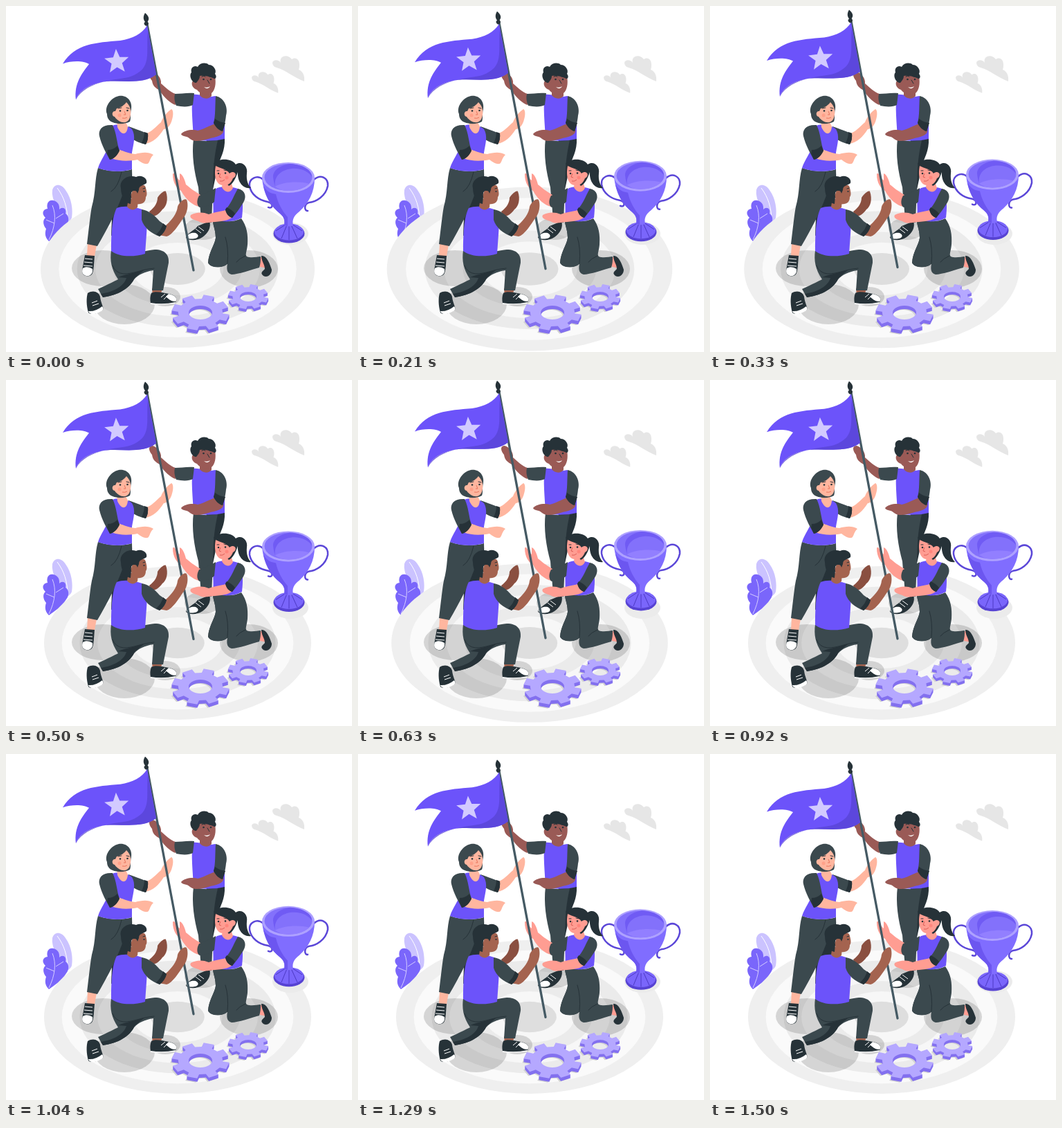
Write an HTML page that moves like this. It is 500 px wide and 500 px high and loops after 1540 ms.

```html
<!DOCTYPE html>
<html lang="en">
<head>
<meta charset="utf-8">
<title>Team raising a flag</title>
<style>
html, body { margin: 0; width: 100%; height: 100%; overflow: hidden; background: #fff; }
svg { display: block; width: 100%; height: 100%; }
.p { fill: #6c53fa; }
.s { fill: #5743d3; }
.d { fill: #3b494e; }
.k { fill: #263238; }
.w { fill: #fff; }
.a { fill: #ffb69f; }
.b { fill: #ff9d92; }
.c { fill: #a4634f; }
.e { fill: #9a5a56; }
.l { fill: none; stroke: #263238; stroke-width: 1; stroke-linecap: round; }
.sh { fill: #000; opacity: .14; }
</style>
</head>
<body>
<svg viewBox="0 0 500 500">
  <g id="plant">
    <path fill="#cbc3ff" d="M67 266C70 256 80 257 86 266C95 278 97 295 95 306C92 314 80 318 74 306C76 294 65 278 67 266Z"/>
    <path fill="none" stroke="#fff" d="M74 263C84 276 89 292 89 310"/>
    <path fill="#7a66fb" d="M62 340C56 334 56 328 58 322C53 316 53 309 57 306C51 300 53 294 60 293C58 285 62 280 68 281C74 282 78 287 77 294C82 289 88 293 86 300C91 303 92 311 87 317C80 328 70 334 62 340Z"/>
    <path fill="none" stroke="#d5cdff" d="M67 288C73 302 71 320 62 338M58 309L70 314M72 307L83 300"/>
  </g>
  <g id="floor"></g>
  <g class="sh">
    <ellipse cx="140" cy="379" rx="45" ry="26"/>
    <ellipse cx="171" cy="431" rx="44" ry="29"/>
    <ellipse cx="230" cy="420" rx="22" ry="14"/>
    <ellipse cx="351" cy="380" rx="42" ry="27"/>
    <ellipse cx="284" cy="322" rx="26" ry="16"/>
  </g>
  <ellipse cx="411" cy="329" rx="26" ry="16" fill="#ebebeb"/>
  <g fill="#e6e6e6">
    <path id="cloud" d="M385 82C386 77 394 77 397 82C394 71 408 69 413 77C423 71 426 84 423 92C429 94 432 101 431 109C417 104 405 93 391 89C387 88 385 85 385 82Z"/>
    <use href="#cloud" transform="translate(35.5 35.4) scale(.83)"/>
  </g>

  <g id="cup">
    <g fill="none" stroke="#5b47d8" stroke-width="2.5" stroke-linecap="round">
      <path d="M372 251C362 243 351 250 352 260C354 273 366 281 378 283C387 285 386 294 379 291"/>
      <path d="M445 251C455 242 466 249 465 260C462 275 448 283 438 284C430 286 431 297 436 296"/>
    </g>
    <ellipse cx="409" cy="329" rx="22.5" ry="13.5" fill="#5743d3"/>
    <ellipse cx="409" cy="326.5" rx="21" ry="12" fill="#7a66fb"/>
    <path fill="none" stroke="#4c39c4" d="M407 314L390 325M407 314L398 336M409 314V338M411 314L421 336M411 314L428 325"/>
    <path fill="#806dff" d="M370 248C372 275 384 290 396 300C403 306 403 311 402 317Q409 320 415 317C413 309 416 303 424 297C437 285 446 270 446 248Z"/>
    <path fill="#6c56f0" d="M372 260C378 270 385 271 390 272C393 285 399 296 407 305Q407 313 407 318L402 317C403 311 403 306 396 300C385 291 376 279 372 260Z"/>
    <ellipse cx="408" cy="248" rx="38" ry="22" fill="#aea1ff"/>
    <ellipse cx="408" cy="247.5" rx="34.5" ry="19.5" fill="#8371fb"/>
    <path fill="#705bf4" d="M386 247C386 236 398 230 410 228C429 229 442 237 442 247C438 240 427 234 413 235C396 237 387 247 389 261Q387 256 386 247Z"/>
    <path fill="#927fff" d="M389 261C401 254 424 253 438 257C430 264 420 267 408 267C400 267 393 264 389 261Z"/>
  </g>

  <g id="gears"></g>

  <g id="tallMan">
    <path class="k" d="M290 192L316 191C317 210 309 220 306 232L298 270L283 275Z"/>
    <path class="d" d="M271 192C282 196 295 196 306 194C302 212 301 222 300 235L297 313L282 313C281 290 279 276 278 262C272 240 268 215 271 192Z"/>
    <path class="k" d="M277 318L294 311C297 320 292 328 284 334C275 340 264 339 260 335C261 328 272 325 277 318Z"/>
    <path class="w" d="M261 333C264 328 270 327 274 328C279 330 279 335 273 336C267 337 261 337 261 333Z"/>
    <path stroke="#fff" d="M274 322L282 328M278 319L286 325"/>
    <path class="e" d="M245 127C238 125 230 117 224 112C225 105 219 97 212 95C205 95 206 102 211 108C212 116 217 119 222 122C228 132 238 141 245 143Z"/>
    <path class="p" d="M270 128C280 126 290 134 302 130C312 135 317 145 316 156V192C300 196 282 195 271 193C270 170 267 145 270 128Z"/>
    <path class="d" d="M272 126C262 125 252 127 244 127Q242 135 246 144C255 146 265 146 270 143Z"/>
    <path class="e" d="M280 118L297 120V130C292 136 284 134 280 129Z"/>
    <path class="e" d="M313 167C300 169 287 178 277 180C270 178 258 179 253 185C254 189 261 187 266 192C274 198 285 194 296 191C306 189 316 186 314 178Z"/>
    <path class="d" d="M303 130C316 133 321 147 318 158C317 168 315 176 313 181C308 180 303 175 300 169C303 158 302 145 303 130Z"/>
    <path class="k" d="M302 163C307 167 312 168 317 169L313 181C308 180 303 175 300 169Z"/>
    <path class="e" d="M272 99C284 100 298 97 302 102C304 112 302 122 297 126C290 130 280 127 276 121C268 119 266 108 273 107Z"/>
    <path class="k" d="M275 111C268 111 264 100 268 96C266 89 272 85 277 88C280 82 289 81 293 85C300 85 305 93 302 98C306 103 302 107 299 104C293 101 283 100 280 101C280 106 277 108 275 111Z"/>
    <path class="l" d="M283 102Q286 100 288 102M294 102L298 102M291 107L294 112"/>
    <circle class="k" cx="285.500" cy="106" r="1.300"/><circle class="k" cx="296" cy="106" r="1.300"/>
    <path class="w" d="M286 117Q291 119 295 116Q292 122 286 117Z"/>
  </g>

  <g id="leftWoman">
    <path class="k" d="M155 255L182 236C184 270 176 300 169 330L152 332Z"/>
    <path class="a" d="M118 343L131 345L128 362L117 361Z"/>
    <path class="d" d="M133 234C150 240 170 240 182 236C182 248 178 258 170 268C163 290 148 320 132 347L117 344C120 320 122 300 124 290C130 270 128 250 133 234Z"/>
    <path class="l" d="M167 240Q162 262 152 268"/>
    <path class="k" d="M114 360L128 361C127 372 127 384 124 388C119 393 109 390 110 382Z"/>
    <path class="w" d="M111 379C115 376 121 377 125 380C126 387 121 391 116 390C110 388 109 384 111 379Z"/>
    <path stroke="#fff" d="M114 365L125 366M113 370L125 371M112 375L125 376"/>
    <path class="a" d="M203 184C210 182 217 174 224 168C227 160 233 153 239 149C242 150 242 158 240 164C238 173 232 178 228 178C221 189 212 198 201 199Z"/>
    <path class="d" d="M177 174C189 178 198 182 205 184Q206 193 202 200C194 198 187 196 180 190Z"/>
    <path class="k" d="M200 182L205 184Q206 193 202 200L196 198Q200 190 200 182Z"/>
    <path class="p" d="M154 173C160 170 176 172 182 178C188 188 184 200 182 212V236C165 241 145 239 133 234C137 222 145 212 147 205C148 190 148 178 154 173Z"/>
    <path class="a" d="M160 164L172 166L176 174C175 187 167 188 161 175Z"/>
    <path class="a" d="M152 220C165 225 180 224 190 222C196 227 203 230 206 227C209 222 208 220 213 215C205 210 195 212 187 214C176 213 168 209 160 206Z"/>
    <path class="d" d="M154 172C139 171 133 179 135 188C138 201 145 213 150 222C156 221 161 215 164 209C160 198 160 184 154 172Z"/>
    <path class="k" d="M147 208Q155 208 161 202L164 209C161 216 156 221 150 222L146 213Z"/>
    <path class="d" d="M146 156C142 147 150 133 163 130C175 128 183 138 181 149C179 156 181 162 179 167C172 171 161 171 154 168C149 166 146 162 146 156Z"/>
    <path class="a" d="M160 148C166 147 171 143 174 139C179 144 181 150 180 157C179 165 175 169 168 168C163 167 159 163 157 160C152 159 153 151 158 152Z"/>
    <circle class="k" cx="165" cy="151.500" r="1.300"/><circle class="k" cx="175.500" cy="151" r="1.300"/>
    <path class="l" d="M162 148L167 147M174 147L178 148"/>
    <path fill="none" stroke="#e8765f" d="M171 152L173 157L170 157M168 162Q172 163 175 161"/>
    <circle cx="164" cy="158" r="2.500" fill="#ff927b" opacity=".6"/>
  </g>

  <g id="rightWoman">
    <path class="b" d="M281 273C272 268 265 262 260 258C258 250 255 243 251 242L251 252C246 248 243 238 241 243C241 256 247 264 253 267C260 280 270 288 279 290Z"/>
    <path class="b" d="M364 363L374 363L378 379L367 377Z"/>
    <path class="k" d="M369 361C376 360 381 371 384 381C384 388 378 393 372 390C367 386 370 384 374 380C374 373 369 369 369 361Z"/>
    <path class="k" d="M300 306L325 312L321 372C312 380 295 378 292 371C293 355 302 345 303 335C303 320 297 315 300 306Z"/>
    <path class="d" d="M300 306C312 314 330 312 340 307C348 318 350 330 349 345C348 355 345 360 348 362C355 365 363 362 368 362C368 368 368 372 366 378C355 381 335 388 326 388C318 386 319 378 320 372L317 375C308 379 295 378 292 371C293 355 302 345 303 335C303 320 297 315 300 306Z"/>
    <path class="l" d="M320 372Q322 350 317 334M346 361Q337 365 333 370"/>
    <path class="p" d="M302 265C310 259 325 261 335 264C343 272 343 290 341 306C326 314 309 312 299 307C301 292 297 276 302 265Z"/>
    <path class="d" d="M303 263C295 268 285 272 279 274C274 283 277 290 280 291C289 290 297 287 301 283Z"/>
    <path class="b" d="M313 254L325 254L328 263C324 271 316 270 312 262Z"/>
    <path class="b" d="M322 294C310 297 301 298 293 301C284 297 274 298 267 302C264 307 272 309 278 311C285 316 295 312 302 312C315 311 325 309 329 303Z"/>
    <path class="d" d="M335 264C346 266 348 276 343 284C338 292 333 299 327 306C322 305 318 300 317 294C325 287 328 276 335 264Z"/>
    <path class="k" d="M319 291Q326 294 331 300L327 306C322 305 318 300 317 294Z"/>
    <path class="k" d="M300 228C305 220 326 219 332 229C341 223 350 232 348 242C347 252 350 259 354 263C342 265 334 253 335 240C332 249 328 257 322 260L310 246Z"/>
    <path class="b" d="M303 231C310 235 319 235 323 242C330 236 336 245 328 249C325 256 321 260 313 259C304 258 300 247 303 231Z"/>
    <circle class="k" cx="307" cy="242" r="1.300"/><circle class="k" cx="317" cy="241.500" r="1.300"/>
    <path class="l" d="M305 238L308 238M315 237L320 238"/>
    <path fill="none" stroke="#dc5f59" d="M310 242L308 247L311 248M309 253Q313 254 316 251"/>
    <circle cx="319" cy="248" r="2.500" fill="#ff7770" opacity=".6"/>
  </g>

  <g id="flag">
    <path stroke="#455a64" stroke-width="3.300" stroke-linecap="round" d="M203.500 24L271 382"/>
    <path class="k" d="M201 10C205 13 207 17 206 20L204.500 23A3 3 0 1 1 201 23C198 19 198 15 201 10Z"/>
    <path class="p" d="M204 28C197 40 183 47 165 50C130 53 100 54 82 83.500C95 79 112 79 120 84C110 97 98 112 101 135.500C107 119 125 112 145 109C170 107 197 114 217 99Z"/>
    <path class="s" opacity=".75" d="M205 35C202 70 212 90 180 102C165 107 117 106 101 135.500C107 119 125 112 145 109C170 107 197 114 217 99Z"/>
    <polygon id="star" fill="#d2caff"/>
  </g>

  <g id="kneelingMan">
    <path fill="#8a4f40" d="M207 297C215 291 219 284 219 277C223 271 229 266 231 268C235 279 232 290 226 294C221 301 216 304 210 304Z"/>
    <path class="c" d="M211 408H226L223 419H212Z"/>
    <path class="k" d="M210 415C216 411 228 415 236 416C246 418 248 424 245 428C235 431 218 431 209 430C208 424 208 420 210 415Z"/>
    <path class="w" d="M235 416C246 418 248 424 245 427C237 427 234 422 231 420ZM209 429Q227 432 245 428L244 430Q227 432 209 431Z"/>
    <path stroke="#fff" d="M224 421L230 416M228 424L234 418"/>
    <path class="k" d="M118 415C126 410 134 413 136 420C137 430 142 436 140 439C132 445 122 447 119 443C116 432 116 422 118 415Z"/>
    <path class="w" d="M119 441Q129 442 139 434C142 438 140 440 136 442C129 446 121 447 119 441Z"/>
    <path stroke="#fff" d="M124 429L132 426M125 433L134 430"/>
    <path class="d" d="M152 353C165 362 200 354 215 352C230 352 236 360 235 371L227 411L211 411L213 382C200 384 192 388 185 395C178 408 162 418 140 421L133 409C148 402 158 397 162 395C152 380 150 368 152 353Z"/>
    <path class="k" d="M162 392C174 387 189 385 200 381C192 388 187 391 185 395C178 408 162 418 140 421L137 416C157 413 171 404 174 393Z"/>
    <path class="l" d="M154 375Q158 386 170 387C185 387 194 381 214 379"/>
    <path class="p" d="M160 292C170 288 185 290 197 294C205 302 204 318 203 330L201 358C185 363 163 363 152 354C152 330 153 305 160 292Z"/>
    <path class="c" d="M231 317C240 309 247 300 248 290C250 284 258 277 261 280C264 287 262 298 258 304C250 315 241 331 232 333L221 331Z"/>
    <path class="d" d="M196 294C206 295 215 303 222 311L232 318Q230 327 222 333C210 329 199 320 196 309Z"/>
    <path class="k" d="M227 314L232 318Q230 327 222 333L217 330Q225 323 227 314Z"/>
    <path class="c" d="M177 278L191 280L190 291C184 297 178 294 175 290Z"/>
    <path class="c" d="M187 259C193 257 199 258 201 260C203 266 205 273 202 276C202 284 197 287 189 286L179 276Z"/>
    <path class="k" d="M166 263C163 252 176 243 188 247C197 243 205 250 203 256C198 260 192 259 192 266L190 271C187 264 179 267 181 275L180 286C172 285 166 275 166 263Z"/>
    <circle class="c" cx="185.500" cy="271" r="4"/>
    <path class="l" d="M198 264L201 263"/><circle class="k" cx="199.500" cy="268" r="1.100"/>
  </g>
</svg>
<script>
const PERIOD = 1540, LEAD = 40, LIFT = 9.5;
const $ = id => document.getElementById(id);

// Alternating floor rings
const tones = ['#efefef', '#fafafa', '#ebebeb', '#f7f7f7', '#ebebeb', '#f7f7f7', '#dedede'];
$('floor').innerHTML = tones.map((c, i) => {
  const r = 193 - 25.7 * i;
  return `<ellipse rx="${r}" ry="${r * .575}" fill="${c}"/>`;
}).join('');

$('star').setAttribute('points', Array.from({ length: 10 }, (_, i) => {
  const a = i * Math.PI / 5 - Math.PI / 2 - .06, r = i % 2 ? 8 : 18.5;
  return `${160 + r * Math.cos(a)},${80.5 + r * Math.sin(a)}`;
}).join(' '));

function gearPath(rx, ry, hx, hy) {
  let d = '';
  for (let i = 0; i < 8; i++) {
    const mid = i * Math.PI / 4 + .3;
    for (const [off, k] of [[-.24, .77], [-.19, 1], [.19, 1], [.24, .77]]) {
      const a = mid + off;
      d += `${d ? 'L' : 'M'}${rx * k * Math.cos(a)} ${ry * k * Math.sin(a)}`;
    }
  }
  return `${d}ZM${-hx} 0A${hx} ${hy} 0 1 0 ${hx} 0A${hx} ${hy} 0 1 0 ${-hx} 0Z`;
}

function gear(x, y, rx, ry, hx, hy, depth) {
  const d = gearPath(rx, ry, hx, hy);
  const layer = (dx, dy, fill) =>
    `<path d="${d}" transform="translate(${x + dx} ${y + dy})" fill="${fill}" fill-rule="evenodd"/>`;
  let out = layer(-2, depth + 1, '#d2d2d2');
  for (let k = depth; k > 0; k--) out += layer(0, k, '#8370ef');
  return out + layer(0, 0, '#b5a8ff');
}
$('gears').innerHTML = gear(281, 443, 42, 26, 17, 10, 5) + gear(350, 420, 29.5, 18, 12, 7, 4);

// Two beats, then a rest
function beat(p) {
  const keys = [[0, 0], [.1, 1], [.3, 0], [.4, 0], [.5, 1], [.6, 0], [1, 0]];
  const i = keys.findIndex(k => p < k[0]);
  const [p0, v0] = keys[i - 1], [p1, v1] = keys[i];
  return 1 + .1 * (v0 + (v1 - v0) * (p - p0) / (p1 - p0));
}

function draw(ms) {
  const p = ((ms + LEAD) % PERIOD) / PERIOD;
  const y = -LIFT * (1 - Math.cos(2 * Math.PI * p)) / 2;
  $('flag').setAttribute('transform', `translate(0 ${y})`);
  $('cup').setAttribute('transform', `translate(0 ${y})`);
  $('floor').setAttribute('transform', `translate(248 380) scale(${beat(p)})`);
}

let start;
function tick(now) {
  start ??= now;
  draw(now - start);
  requestAnimationFrame(tick);
}
draw(0);
requestAnimationFrame(tick);
</script>
</body>
</html>
```
